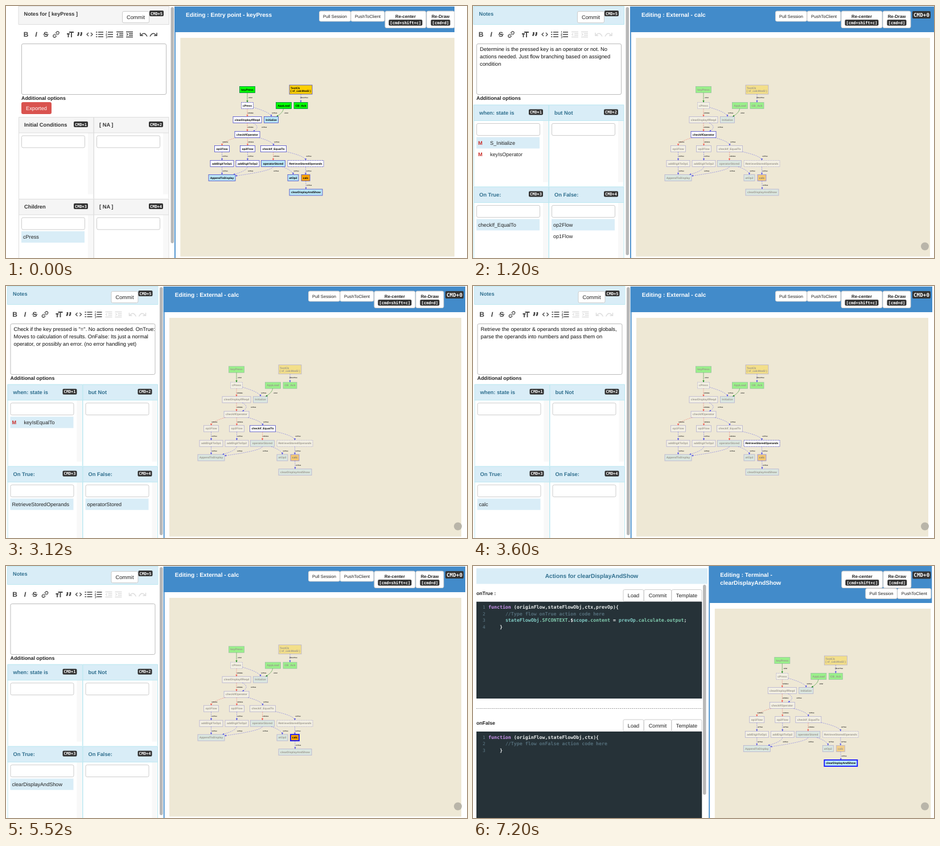
Write an HTML page that moves like this. It is 810x443 px and loops after 8 s.

```html
<!DOCTYPE html>
<html lang="en">
<head>
<meta charset="utf-8">
<title>Flow editor</title>
<style>
  html, body { margin: 0; width: 100%; height: 100%; overflow: hidden; background: #fff; }
  svg { display: block; width: 810px; height: 443px; font-family: "Liberation Sans", Arial, sans-serif; text-rendering: geometricPrecision; }
  .mono { font-family: "DejaVu Sans Mono", monospace; font-weight: 700; white-space: pre; }
</style>
</head>
<body>
<svg id="stage" viewBox="0 0 810 443"></svg>
<script>
const BOLD = 'font-weight="700"', MID = 'text-anchor="middle"', MONO = 'class="mono"';
const BLUE = '#428bca', PALE = '#d9edf7', INK = '#222', SAND = '#eee8d5';

const esc = s => s.replace(/&/g, '&amp;').replace(/</g, '&lt;');
const text = (x, y, s, size, fill = INK, extra = '') =>
  `<text x="${x}" y="${y + size * .36}" font-size="${size}" fill="${fill}" ${extra}>${esc(s)}</text>`;
const rect = (x, y, w, h, fill, extra = '') =>
  `<rect x="${x}" y="${y}" width="${w}" height="${h}" fill="${fill}" ${extra}/>`;
const box = (x, y, w, h, stroke = '#ccc') => rect(x, y, w, h, '#fff', `stroke="${stroke}" rx="2.5"`);
const path = (d, stroke, width = 1, extra = '') =>
  `<path d="${d}" fill="none" stroke="${stroke}" stroke-width="${width}" ${extra}/>`;
const group = (x, y, body) => `<g transform="translate(${x} ${y})">${body}</g>`;
const button = (x, y, w, h, label, size) =>
  box(x + .5, y + .5, w - 1, h - 1) + text(x + w / 2, y + h / 2, label, size, INK, MID);
const badge = (x, y, w, h, label, size = 7) =>
  rect(x, y, w, h, '#333', 'rx="2"') + text(x + w / 2, y + h / 2, label, size, '#fff', `${MONO} ${MID}`);

// ---- flow graph: name, centre x, centre y, width, fill
const nodes = {};
`keyPress 405 147 27 #0f0
TestCb 499 147 40 #ffd000
cPress 405 175 21 #fff
AppLoad 469 175 27 #0f0
CB_Ack 499 175 24 #0f0
clearDisplayIfReqd 405 200 50 #fff
Initialize 447 200 25 #b9e6f7
checkIfOperator 405 226 44 #fff
op1Flow 360.5 251 26 #fff
op2Flow 405.5 251 26 #fff
checkIf_EqualTo 451 251 45 #fff
addDigitToOp1 360.5 277 41 #fff
addDigitToOp2 405.5 277 41 #fff
operatorStored 450.5 277 42 #b9e6f7
RetrieveStoredOperands 507.5 277 63 #fff
AppendToDisplay 360.5 302 47 #b9e6f7
atOp2 485.5 302 19 #b9e6f7
calc 507.5 302 15 #ffa500
clearDisplayAndShow 508 327.5 58 #b9e6f7`.split('\n').forEach(line => {
  const [name, x, y, w, fill] = line.split(' ');
  nodes[name] = { x: +x, y: +y, w: +w, h: name === 'TestCb' ? 16 : 11, fill };
});

// from, to, label, optional x the curve bends through
const edges = `keyPress cPress enter
TestCb CB_Ack CB-onTrue
cPress clearDisplayIfReqd onFalse
cPress Initialize onTrue
AppLoad Initialize enter 468
clearDisplayIfReqd checkIfOperator onFalse
clearDisplayIfReqd checkIfOperator onTrue 429
checkIfOperator op1Flow onFalse
checkIfOperator op2Flow onFalse
checkIfOperator checkIf_EqualTo onTrue
op1Flow addDigitToOp1 onTrue
op2Flow addDigitToOp2 onTrue
checkIf_EqualTo operatorStored onFalse
checkIf_EqualTo RetrieveStoredOperands onTrue
addDigitToOp1 AppendToDisplay onTrue
addDigitToOp2 AppendToDisplay onTrue 405
operatorStored AppendToDisplay onTrue 450
operatorStored atOp2 onTrue
RetrieveStoredOperands calc onTrue
calc clearDisplayAndShow onTrue`.split('\n').map(line => line.split(' '));

const edgeStyles = { enter: ['#1a8a1a', ''], onFalse: ['#f4574c', '2 1.4'], onTrue: ['#5050e8', '2 1.4'] };
const markers = '<defs>' + Object.entries(edgeStyles).map(([key, [color]]) =>
  `<marker id="${key}" viewBox="0 0 4 4" refX="4" refY="2" markerWidth="3.2" markerHeight="3.2"
    markerUnits="userSpaceOnUse" orient="auto"><path d="M0 0L4 2L0 4Z" fill="${color}"/></marker>`).join('') + '</defs>';

// Point on the node's border in the direction of (px, py)
function border(n, px, py) {
  const dx = px - n.x, dy = py - n.y;
  const k = Math.min(n.w / 2 / Math.abs(dx || .01), n.h / 2 / Math.abs(dy || .01));
  return `${n.x + dx * k} ${n.y + dy * k}`;
}

function edge([from, to, label, bend]) {
  const a = nodes[from], b = nodes[to], x = +(bend || b.x), y = (a.y + b.y) / 2;
  const key = label.replace('CB-', ''), [color, dash] = edgeStyles[key];
  return path(`M${border(a, x, y)}Q${x} ${y} ${border(b, x, y)}`, color, .5,
      `stroke-dasharray="${dash}" marker-end="url(#${key})"`) +
    text(x + 5.7, y + .5, label, 2.75, '#111', `${BOLD} ${MID}`);
}

function node(name, active, editing) {
  const { x, y, w, h, fill } = nodes[name];
  const lit = !active || name === active, thick = lit && name === editing;
  const stroke = name === editing ? '#11f' : fill === '#0f0' ? '#074' : '#4a4ac8';
  const dash = /^(cPress|Retr)/.test(name) ? 'stroke-dasharray="2 1"' : '';
  const label = name === 'TestCb'
    ? text(x - 18, y - 2.5, name, 4.95, '#000', BOLD) + text(x - 18, y + 2.7, '( sf_calcMod2 )', 4.95, '#000', BOLD)
    : text(x, y, name, 4.95, '#000', `${BOLD} ${MID}`);
  return `<g opacity="${lit ? 1 : name === editing ? .46 : .35}">` +
    rect(x - w / 2, y - h / 2, w, h, fill, `stroke="${stroke}" stroke-width="${thick ? 1.8 : .8}" ${dash}`) + label + '</g>';
}

const graph = s => group(s.gx, s.gy, edges.map(edge).join('') +
  Object.keys(nodes).map(n => node(n, s.active, s.editing)).join(''));

// ---- notes layout
const bullets = 'M-3-4h9M-3 0h9M-3 4h9';
const icons = [
  [14, c => text(0, 0, 'B', 12, c, `${BOLD} ${MID}`)],
  [32, c => text(0, 0, 'I', 12, c, `${BOLD} ${MID} font-style="italic"`)],
  [49, c => text(0, 0, 'S', 12, c, `${BOLD} ${MID}`) + path('M-5 0h10', c)],
  [67, c => `<g transform="rotate(-45)">${path('M-1-2.3h-3a2.3 2.3 0 0 0 0 4.6h3M1-2.3h3a2.3 2.3 0 0 1 0 4.6h-3M-3 0h6', c, 1.2)}</g>`],
  [92, c => path('M-6-1h5M-3.5-1v6M-2-4h8M2-4v9', c, 1.8)],
  [109, c => path('M-2.5-4v3.5l-1.5 3M2.5-4v3.5l-1.5 3', c, 2.6)],
  [126, c => path('M-2-3l-3 3 3 3M2-3l3 3-3 3', c, 1.3)],
  [144, c => path(bullets + 'M-7-4h2.4M-7 0h2.4M-7 4h2.4', c, 1.7)],
  [161, c => path(bullets, c, 1.5) + path('M-5.5-6v3M-6.5-1.2h2l-2 2.4h2M-6.5 3h2v3h-2', c, .8)],
  [179, c => path('M-6-4.5h12M-1-1.5h7M-1 1.5h7M-6 4.5h12M-3-2l-2 2 2 2', c, 1.3)],
  [196, c => path('M-6-4.5h12M-1-1.5h7M-1 1.5h7M-6 4.5h12M-5-2l2 2-2 2', c, 1.3)],
  [221, c => path('M-6-3v5h5M-5 1.5Q1-6 6 3.5', c, 1.5)],
  [238, c => path('M6-3v5h-5M5 1.5Q-1-6-6 3.5', c, 1.5)]
];

function panel(s, i, title, items) {
  const x = 1 + i % 2 * 132, y = 173.5 + s.py + (i > 1 ? 144 : 0);
  const marked = i === 0;
  return rect(x, y, 132, 28, s.head) + rect(x + 122, y + 28, 9, 108, '#f8f8f8') +
    path(`M${x + .5} ${y + 144}V${y + .5}h131.5v143M${x} ${y + 28}h132`, s.line) +
    text(x + 10, y + 13.7, title, 9.3, s.ink, BOLD) +
    badge(x + 97, y + 8, 25, 10, 'CMD+' + (i + 1)) +
    box(x + 5.5, y + 33, 111, 21) +
    items.map((item, k) => {
      const cy = y + 67 + k * 20.3;
      return (k ? '' : rect(x + 5, cy - 10, 111, 20, PALE)) +
        (marked ? text(x + 8, cy, 'M', 9.2, '#c9302c', BOLD) : '') +
        text(x + (marked ? 29 : 8), cy, item, 9.1);
    }).join('');
}

function notesLayout(s) {
  const left = rect(1, 1, 264, 31, s.head) + path('M1 32.5V.5H265.5V32.5H1', s.line) +
    text(10.5, 14, s.heading, 9.2, s.ink, BOLD) +
    button(183, 9, 48, 21, 'Commit', 9.3) + badge(231, 8, 25, 10, 'CMD+5') +
    icons.map(([x, draw], i) => group(x, 50, draw(i > 8 && s.active ? '#ddd' : '#444'))).join('') +
    box(6.5, 66.5, 254, 89, '#bbb') +
    s.note.map((line, i) => text(12, 75.7 + i * 12.8, line, 9.33, '#111')).join('') +
    text(6, 162, 'Additional options', 8.9, INK, BOLD) +
    (s.active ? '' : rect(6, 169, 53, 21, '#d9534f', 'rx="3"') + text(32.5, 179.5, 'Exported', 9.2, '#fff', MID)) +
    s.panels.map(([title, ...items], i) => panel(s, i, title, items)).join('') +
    rect(268.5, 2, 5.5, s.active ? 436 : 415, '#b8b8b8', 'rx="2.7"');
  // the divider sits between the two columns and moves by their mean offset
  const edgeX = 276 + (s.x + s.gx) / 2;
  const right = rect(edgeX, 1, s.right - edgeX, 45, BLUE) + rect(edgeX, 1, 1.8, 442, BLUE) +
    text(edgeX + 20, 15.5, s.title, 10.2, '#fff', BOLD) +
    rect(edgeX + 10.3, 56, s.sandRight - edgeX - 10.3, 384.5, SAND);
  const buttons = button(531, 8.5, 56, 19, 'Pull Session', 7.65) +
    button(586.5, 8.5, 60, 19, 'PushToClient', 7.65) + viewButtons(646.5);
  return group(s.x, 0, left) + right + group(s.gx, 0, buttons) +
    (s.active ? badge(772, 9, 32, 13, 'CMD+0', 9.3) : '');
}

const viewButtons = x => button(x, 8.5, 73, 30.5, '', 8) + button(x + 73, 8.5, 50, 30.5, '', 8) +
  text(x + 36.5, 18, 'Re-center', 7.8, INK, `${BOLD} ${MID}`) + badge(x + 7, 24, 59, 10.5, '[cmd+shift+c]') +
  text(x + 98, 18, 'Re-Draw', 7.8, INK, `${BOLD} ${MID}`) + badge(x + 81, 24, 34, 10.5, '[cmd+d]');

// ---- code layout
const tokens = /(\/\/.*)|\b(function|var|return|if)\b|\b(null)\b|(\([\w,]+\)\{|actionOp(?= =)|promiseArray|dep(?= =))|(\.\w+|\w+(?=:))|(\w+)|([^\w]+?)/g;
const colors = ['#546e7a', '#c792ea', '#f77669', '#e9eded', '#80cbae', '#80cbc4', '#e9eded'];
const highlight = line => line.replace(tokens, (token, ...parts) =>
  `<tspan fill="${colors[parts.findIndex(Boolean)]}">${esc(token)}</tspan>`);

function editor(y, h, lines, scroll) {
  const rows = lines.map((line, i) => {
    const cy = y + 10 + i * 11.5, indent = line.search(/\S|$/);
    return text(21, cy, `${i + 1}`, 7.6, '#607d8b', 'class="mono" style="font-weight:400" text-anchor="end"') +
      `<text x="${26.5 + indent * 4.98}" y="${cy + 2.6}" font-size="8.27" class="mono">${highlight(line.trim())}</text>`;
  }).join('');
  return `<svg x="0" y="${y}" width="402" height="${h}" viewBox="0 ${y} 402 ${h}" style="width:402px;height:${h}px">` +
    rect(5.5, y, 396.5, h, '#263238') + rows +
    (scroll ? rect(392, y, 10, h, '#fafafa') + rect(394, y + 2.5, 5, scroll, '#bbb', 'rx="2.5"') : '') + '</svg>';
}

const buttonRow = y => button(263, y, 37, 22, 'Load', 9.2) + button(299.5, y, 49, 22, 'Commit', 9.2) +
  button(348, y, 54, 22, 'Template', 9.2);

function codeLayout(s) {
  const long = s.editing === 'calc', ink = long ? '#333' : '#fff';
  const left = rect(5.5, 4, 406, 27.5, PALE) + text(208, 17.5, 'Actions for ' + s.editing, 10.2, '#31708f', `${BOLD} ${MID}`) +
    text(5.5, 47.5, 'onTrue :', 8.7, INK, BOLD) + buttonRow(41) + editor(62.5, 170.5, s.onTrue, long && 45) +
    (long ? rect(5.5, 223.5, 387, 9.5, '#fafafa') + rect(26.5, 225.5, 222, 5.5, '#bbb', 'rx="2.7"') : '') +
    path('M5.5 250.5H402', '#999', 1, 'stroke-dasharray="2 1.5"') +
    text(5.5, 276, 'onFalse', 8.7, INK, BOLD) + buttonRow(269.5) + editor(291, 152, s.onFalse, long && 62) +
    rect(403.5, 33, 5.5, 369, '#b8b8b8', 'rx="2.7"');
  const right = rect(414, 0, 391, 65, long ? '#f5f5f5' : BLUE) + rect(413, 0, 1.8, 443, long ? '#ddd' : BLUE) +
    s.title.map((line, i) => text(433, 15.5 + i * 14, line, 10.2, ink, BOLD)).join('') +
    rect(423.5, 75, 379.5, 368, SAND) + viewButtons(646) +
    button(688, 39, 56.5, 19, 'Pull Session', 7.65) + button(744, 39, 60, 19, 'PushToClient', 7.65) +
    badge(771, 9.5, 32, 13, 'CMD+0', 9.3);
  return group(s.x, 0, left) + group(s.gx - 137, 0, right);
}

// ---- scenes
const calcCode = (branch, tail) => ['function (originFlow,stateFlowObj,ctx,prevOp){',
  '          var   promiseArray = [],', '            actionOp = {};', '',
  `          originFlow.${branch}.externals.forEach(function(ext){`,
  '            var dep = stateFlowObj._dependencies.find(function(item){',
  '              return item._name == ext.dep;', '            });', '            if(dep){', ...tail];
const entry = ['              actionOp[ext.name] = {', '                ctx:sf_clone(ctx),'];

const notes = (active, note, when, onTrue, onFalse, more) => ({
  x: 1.5, py: -.8, gx: 0, gy: -.3, right: 807, sandRight: 800, head: PALE, line: '#bce8f1', ink: '#31708f',
  heading: 'Notes', title: 'Editing : External - calc', editing: 'calc', active, note,
  panels: [['when: state is', ...when], ['but Not'], ['On True:', ...onTrue], ['On False:', ...onFalse]], ...more
});

const scenes = [
  notes('', [], [], [], [], {
    x: 21, py: 21.5, gx: 19, gy: 0, right: 788, sandRight: 788, head: '#f5f5f5', line: '#ddd', ink: '#333', editing: '',
    heading: 'Notes for [ keyPress ]', title: 'Editing : Entry point - keyPress',
    panels: [['Initial Conditions'], ['[ NA ]'], ['Children', 'cPress'], ['[ NA ]']]
  }),
  notes('checkIfOperator', ['Determine is the pressed key is an operator or not. No',
    'actions needed. Just flow branching based on assigned', 'condition'],
    ['S_Initialize', 'keyIsOperator'], ['checkIf_EqualTo'], ['op2Flow', 'op1Flow'],
    { x: 0, py: 0, gy: 0, right: 810, sandRight: 803 }),
  notes('checkIf_EqualTo', ['Check if the key pressed is "=". No actions needed. OnTrue:',
    'Moves to calculation of results. OnFalse: Its just a normal', 'operator, or possibly an error. (no error handling yet)'],
    ['keyIsEqualTo'], ['RetrieveStoredOperands'], ['operatorStored']),
  notes('RetrieveStoredOperands', ['Retrieve the operator & operands stored as string globals,',
    'parse the operands into numbers and pass them on'], [], ['calc'], []),
  notes('calc', [], [], ['clearDisplayAndShow'], []),
  { x: 0, gx: 137, gy: 19.3, active: 'calc', editing: 'calc', title: ['Editing : External -', 'calc'],
    onTrue: calcCode('onTrue', ['', ...entry, '                output:null,', '                moduleName:ext.dep']),
    onFalse: calcCode('onFalse', [...entry, '                output:null', '              }']) },
  { x: .5, gx: 138.3, gy: 19, active: 'clearDisplayAndShow', editing: 'clearDisplayAndShow',
    title: ['Editing : Terminal -', 'clearDisplayAndShow'],
    onTrue: ['function (originFlow,stateFlowObj,ctx,prevOp){', '      //Type flow onTrue action code here',
      '      stateFlowObj.SFCONTEXT.$scope.content = prevOp.calculate.output;', '    }'],
    onFalse: ['function (originFlow,stateFlowObj,ctx){', '      //Type flow onFalse action code here', '    }'] }
];

const stage = document.getElementById('stage');
let shown = -1;
function frame() {
  const index = Math.floor(performance.now() % 8000 / 1200);
  if (index !== shown) {
    const s = scenes[shown = index];
    stage.innerHTML = markers + (s.onTrue ? codeLayout(s) : notesLayout(s)) + graph(s) +
      (s.active ? '<circle cx="794" cy="422.5" r="7" fill="#b9b5a9"/>' : '');
  }
  requestAnimationFrame(frame);
}
frame();
</script>
</body>
</html>
```
